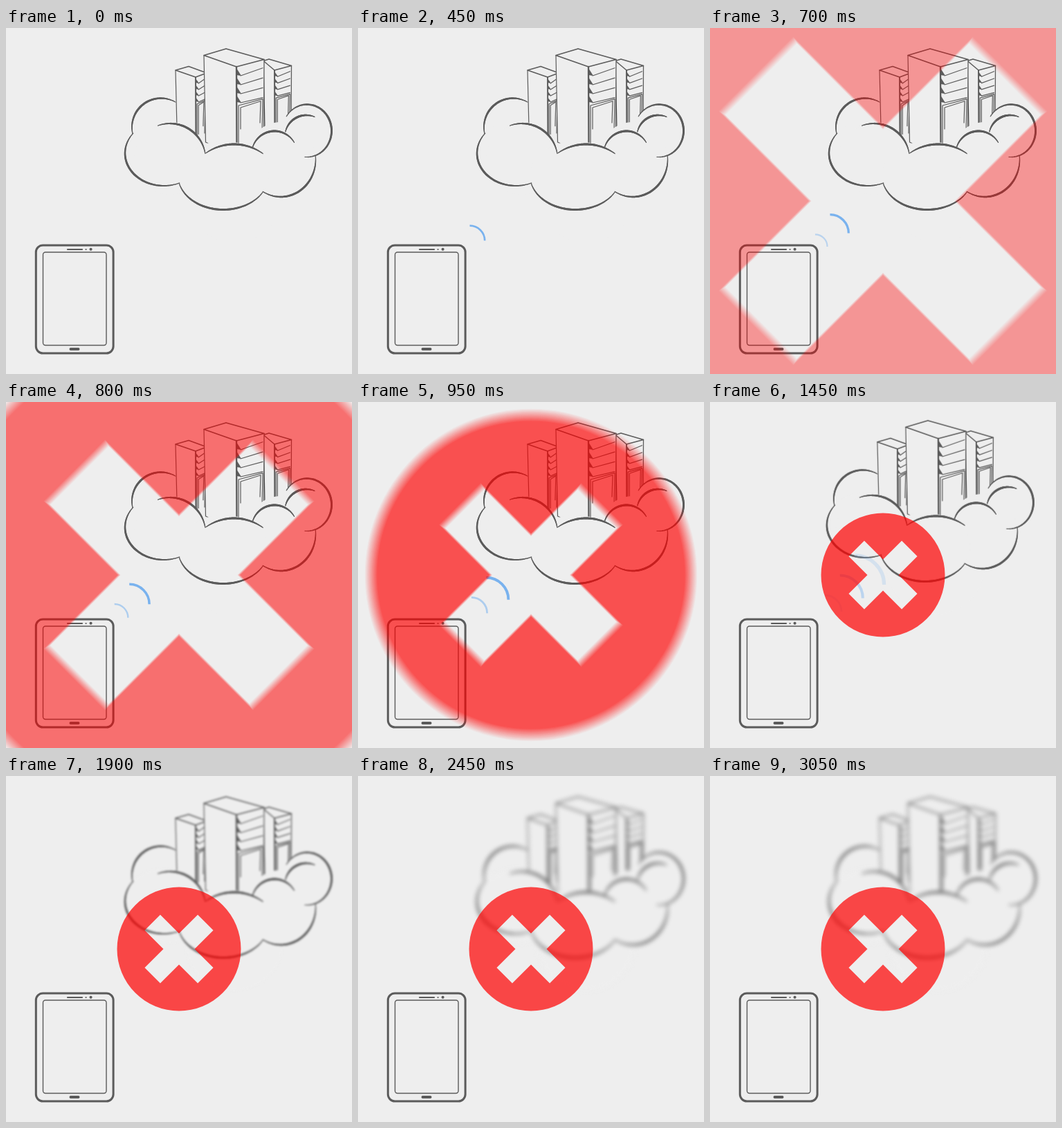
Write an HTML page with a canvas that moves like this. It is 500 by 500 pixels and loops after 3.1 s.

```html
<!DOCTYPE html>
<html>
<head>
<meta charset="utf-8">
<style>
html, body { margin: 0; overflow: hidden; background: #eee }
canvas { display: block }
</style>
</head>
<body>
<canvas id="stage" width="500" height="500"></canvas>
<script>
const LOOP = 3100, FRAME = 50, INK = '#5b5b5b', PAPER = '#eee', SAMPLES = 17;
const ctx = document.getElementById('stage').getContext('2d');
const clamp = x => Math.min(1, Math.max(0, x));
const rad = deg => deg * Math.PI / 180;

function layer() {
  const c = document.createElement('canvas').getContext('2d');
  c.canvas.width = c.canvas.height = 500;
  c.strokeStyle = c.fillStyle = INK;
  c.lineCap = c.lineJoin = 'round';
  return c;
}

function line(c, width, ...pts) {
  c.lineWidth = width;
  c.beginPath();
  pts.forEach(p => c.lineTo(...p));
  c.stroke();
}

function fill(c, color, ...pts) {
  c.fillStyle = color;
  c.beginPath();
  pts.forEach(p => c.lineTo(...p));
  c.fill();
}

// l, e, r, b: top corners at the left, the front edge, the right and the back
function server(c, l, e, r, b, step) {
  const [x, y] = e, k = step / 13, span = r[0] - x;
  const footL = [l[0] + 2.5, 165], footE = [x + .5, 185], footR = [r[0] - .5, 155];
  fill(c, PAPER, l, b, r, footR, footE, footL);
  line(c, 1 + .7 * k, e, l, b, r, e);
  line(c, 1.2, l, footL, footE);
  line(c, 1.3, r, footR);
  line(c, 1 + 1.3 * k, e, footE);
  for (let i = 0; i < 4; i++) {
    const top = y + i * step, low = top + step, tip = x + 6 * k;
    fill(c, INK, [x, top + 2], [tip + 1, low], [x, low - 1]);
    line(c, 1.2, [tip, low], [r[0] - 2, r[1] + 1.1 * step * (i + 1) - 2]);
  }
  // door with an inner frame
  for (const inset of [0, 3 * k]) {
    const left = x + 3 * k + inset, right = x + span - 2 - inset;
    const doorL = y + 4 * step + 4 * k + inset, doorR = r[1] + 4.4 * step + inset;
    line(c, 1.2, [left, 170 - 8 * inset], [left, doorL], [right, doorR], [right - 1, 152 - 5 * inset]);
  }
}

// Elliptic arc, thin at its ends and thick in the middle
function brush(c, [x, y, rx, ry, from, to]) {
  const n = 70;
  for (let i = 0; i < n; i++) {
    const at = j => rad(from + (to - from) * j / n);
    c.lineWidth = 1.1 + 1.9 * Math.sin(Math.PI * (i + .5) / n);
    c.beginPath();
    c.ellipse(x, y, rx, ry, 0, at(i), at(i + 1));
    c.stroke();
  }
}

function drawCloud() {
  const c = layer();
  const backLobe = [224, 143.5, 42, 42, 166, 300];
  const lobes = [
    [228, 181, 56, 47, 66, 218],
    [237, 189.5, 51.5, 51.5, 250, 351],
    [329.5, 239, 71, 71, 235, 306],
    [388, 182, 33, 33, 194, 330],
    [435, 148.5, 35.5, 38, 213, 455],
    [434, 157, 31, 31, 193, 293],
    [397, 190, 50.5, 54, -5, 121],
    [314, 213, 65.5, 49.5, 29, 167]
  ];
  brush(c, backLobe);
  server(c, [245, 61], [274, 71], [290, 65], [264, 55.5], 9);
  server(c, [372, 47.5], [388, 61], [412.5, 54.5], [380, 45], 9.3);
  server(c, [286, 39.5], [333, 56], [373, 45.5], [318, 30], 13);
  c.fillStyle = PAPER;
  for (const [x, y, rx, ry] of lobes) {
    c.beginPath();
    c.ellipse(x, y, rx, ry, 0, 0, 7);
    c.fill();
  }
  lobes.forEach(lobe => brush(c, lobe));
  return c.canvas;
}

function drawPhone() {
  const c = layer(), box = (width, x, y, w, h, r) => {
    c.lineWidth = width;
    c.beginPath();
    c.roundRect(x, y, w, h, r);
    c.stroke();
  };
  box(3, 43.3, 314, 111.8, 156, 10);
  box(1.4, 53.5, 324, 91.5, 134.5, 3.5);
  line(c, 2.2, [89, 320], [110, 320]);
  line(c, 4, [93.5, 464], [104.5, 464]);
  line(c, 2, [115.5, 320], [115.6, 320]);
  line(c, 4, [122.5, 319.7], [122.6, 319.7]);
  return c.canvas;
}

// Disc with a cross cut out: two arms turned by 45 degrees
function signShape() {
  const cross = new Path2D(), half = 54.2, arm = 15.9;
  for (let q = 0; q < 4; q++) {
    const a = rad(45 + 90 * q), u = Math.cos(a), v = Math.sin(a);
    for (const [p, s] of [[half, -arm], [half, arm], [arm, arm]]) cross.lineTo(p * u - s * v, p * v + s * u);
  }
  cross.closePath();
  const shape = new Path2D();
  shape.arc(0, 0, 89.5, 0, 7);
  shape.closePath();
  shape.addPath(cross);
  return shape;
}

const cloud = drawCloud(), phone = drawPhone(), sign = layer(), signPath = signShape();
sign.fillStyle = '#f00';
sign.globalCompositeOperation = 'lighter';

function drawWaves(t) {
  const end = 1 - clamp((t - 1400) / 250);
  [1, .55, .25].forEach((peak, i) => {
    const age = t - 450 * i;
    if (age <= 0) return;
    const r = 12.4 + .0206 * age;
    ctx.globalAlpha = peak * end * clamp(age / 300) * (1 - clamp((age - 1050) / 550));
    ctx.strokeStyle = '#79b2ee';
    ctx.lineWidth = r * .122;
    ctx.beginPath();
    ctx.arc(140 + .0478 * age, 326.8 - .0433 * age, r, -Math.PI / 2, 0);
    ctx.stroke();
  });
  ctx.globalAlpha = 1;
}

// The zooming sign is averaged over a half-frame shutter
function drawSign(t) {
  if (t <= 550) return;
  sign.clearRect(0, 0, 500, 500);
  const n = t < 1150 ? SAMPLES : 1;
  sign.globalAlpha = 1 / n;
  for (let i = 0; i < n; i++) {
    const s = 6 - 5 * clamp((t - 6 + FRAME / 2 * i / SAMPLES - 550) / 594);
    sign.setTransform(s, 0, 0, s, 250, 250);
    sign.fill(signPath, 'evenodd');
  }
  sign.setTransform(1, 0, 0, 1, 0, 0);
  ctx.globalAlpha = .7 * (1 - (1 - clamp((t - 550) / 600)) ** 2.6);
  ctx.drawImage(sign.canvas, 0, 0);
  ctx.globalAlpha = 1;
}

function draw(t) {
  ctx.fillStyle = PAPER;
  ctx.fillRect(0, 0, 500, 500);
  ctx.drawImage(phone, 0, 0);
  const shake = t > 1150 && t < 1650 ? 3.4 * Math.sin((t - 1150) / 500 * 6 * Math.PI) : 0;
  const blur = 3.2 * clamp((t - 1650) / 550);
  ctx.filter = blur ? `blur(${blur}px)` : 'none';
  ctx.drawImage(cloud, shake, shake);
  ctx.filter = 'none';
  drawWaves(t);
  drawSign(t);
}

const start = performance.now();
function tick() {
  const t = (performance.now() - start) % LOOP;
  draw(Math.floor(t / FRAME) * FRAME);
  requestAnimationFrame(tick);
}
tick();
</script>
</body>
</html>
```
